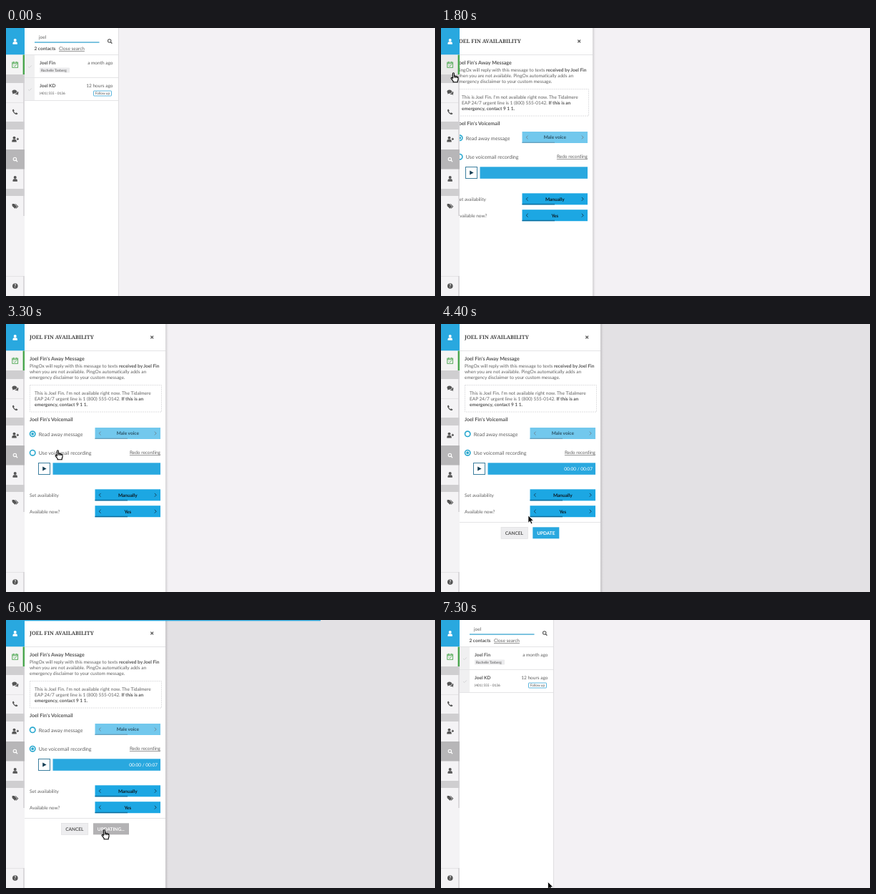
Write an HTML page that moves like this. It is 600 px wide and 375 px high and loops after 9200 ms.

```html
<!DOCTYPE html>
<html lang="en">
<head>
<meta charset="utf-8">
<title>Availability panel</title>
<style>
  html, body { margin: 0; width: 100%; height: 100%; overflow: hidden; background: #f3f1f4; }
  svg { display: block; width: 600px; height: 375px; }
  text { font: 6.5px Lato, sans-serif; fill: #606060; white-space: pre; text-rendering: geometricPrecision; }
  .b { font-weight: 700; fill: #555; }
  .m { font-size: 7.1px; }
  .s { font-size: 4.8px; fill: #505050; }
  .u { text-decoration: underline; }
  .e { text-anchor: end; }
  .c { text-anchor: middle; }
  .w { fill: #fff; }
  .title { font: 700 7.4px "Noto Serif", serif; fill: #444; }
  .line { stroke: #e4e4e6; stroke-width: 1; }
  .blue { fill: #29a8df; }
  .ico { fill: #555; }
</style>
</head>
<body>
<svg viewBox="0 0 600 375">
  <defs>
    <linearGradient id="shade"><stop offset="0" stop-opacity=".13"/><stop offset="1" stop-opacity="0"/></linearGradient>
    <g id="user"><circle cy="-1.9" r="2"/><path d="M-3.2 3.7V2.2Q-3.2 .2-1.3 .2H1.3Q3.2 .2 3.2 2.2V3.7Z"/></g>
    <g id="lens" fill="none" stroke-linecap="round"><circle cx="-.6" cy="-.6" r="2.2" stroke-width="1.1"/><path d="M1.1 1.1L2.7 2.7" stroke-width="1.3"/></g>
    <g id="calendar" fill="none" stroke-width=".9"><rect x="-3.9" y="-3.1" width="7.8" height="7.2"/><path d="M-3.9-1.3H3.9M-2-4.4V-2M2-4.4V-2M-1.8 1.2L-.5 2.5L2 0"/></g>
    <g id="chat"><ellipse cx="-1.2" cy="-.9" rx="3.3" ry="2.5"/><path d="M-3.4 .4L-3.9 2.6L-.8 1.3Z"/><path d="M2.8-1.6Q5 -.6 4.4 1.2Q4 2 3.6 2.3L4.4 3.8L1.9 2.9Q0 3-.8 2.3Q3 2 2.8-1.6Z"/></g>
    <path id="phone" d="M-3.7-2.8L-2.2-3.8L-.9-1.4L-1.9-.5Q-1.2 1 .5 1.9L1.4 .9L3.8 2.2L2.8 3.7Q1 4.2-1.7 1.6Q-4.2-1-3.7-2.8Z"/>
    <g id="tags"><path d="M-4.4-3H-1.4L2.4 .8L-.5 3.7L-4.4-.1Z"/><path d="M-.4-3H.5L4.4 .8L1.4 3.7L.8 3.1L3 .8Z"/></g>
    <g id="select">
      <rect x="124.5" width="91.5" height="16" fill="#1ca7e3"/>
      <rect x="124.5" y="14.6" width="45.5" height="1.4" fill="#0d6c9b"/>
      <path d="M132.6 5.6L130.2 8L132.6 10.4M207.8 5.6L210.2 8L207.8 10.4" fill="none" stroke="#14384c" stroke-width=".9"/>
    </g>
  </defs>

  <rect width="600" height="375" fill="#f3f1f4"/>
  <rect id="dim" x="157" width="443" height="375" fill="#e3e1e4"/>

  <g id="list">
    <rect x="26" width="131" height="375" fill="#fff"/>
    <rect x="157" width="1" height="375" fill="#dfdee0"/>
    <text x="46" y="14.6">joel</text>
    <rect x="40" y="19.4" width="90.5" height="1.3" fill="#3aa5cf"/>
    <use href="#lens" x="145.3" y="18.6" stroke="#555"/>
    <text class="b" x="39.5" y="31.2">2 contacts</text>
    <text class="u" x="74" y="31.2">Close search</text>
    <rect x="26" y="37.5" width="14" height="64" fill="#f0f0f1"/>
    <path d="M31 54L32.6 55.6L35.8 52.4M31 86L32.6 87.6L35.8 84.4" fill="none" stroke="#d2d2d4" stroke-width=".9"/>
    <path class="line" d="M26 37.5H157M26 69.5H157M26 101.5H157"/>
    <text class="b" x="47" y="50.8">Joel Fin</text>
    <text class="e" x="149.5" y="50.8">a month ago</text>
    <rect x="47" y="55.5" width="42" height="7" rx="1" fill="#ebebed"/>
    <text class="s" x="49" y="60.8">Rochelle Tanberg</text>
    <text class="b" x="47" y="82.8">Joel KD</text>
    <text class="e" x="149.5" y="82.8">12 hours ago</text>
    <text class="s" x="47" y="93.3">(401) 555 - 0136</text>
    <rect x="122.5" y="88" width="25" height="7" rx=".6" fill="#fff" stroke="#4fb0dc" stroke-width=".9"/>
    <text class="s c" x="135" y="93.2">Follow up</text>
  </g>

  <g id="panel">
    <rect x="223" width="4" height="375" fill="url(#shade)"/>
    <rect x="26" width="197" height="375" fill="#fff"/>
    <text class="title" x="33" y="21.2">JOEL FIN AVAILABILITY</text>
    <path d="M202.3 16.6L206.1 20.4M206.1 16.6L202.3 20.4" stroke="#555" stroke-width="1.3"/>
    <path class="line" d="M26 37.5H223"/>
    <text class="b m" x="33" y="51">Joel Fin's Away Message</text>
    <text x="33" y="61.3">PingOx will reply with this message to texts <tspan class="b">received by Joel Fin</tspan></text>
    <text x="33" y="69.3">when you are not available. PingOx automatically adds an</text>
    <text x="33" y="77.3">emergency disclaimer to your custom message.</text>
    <rect x="33.5" y="85.5" width="184" height="37.5" fill="none" stroke="#d6d6d8" stroke-width=".8" stroke-dasharray="2 1"/>
    <text x="40" y="98.8">This is Joel Fin. I'm not available right now. The Tidalmere</text>
    <text x="40" y="106.8">EAP 24/7 urgent line is 1 (800) 555-0142. <tspan class="b">If this is an</tspan></text>
    <text class="b" x="40" y="114.8">emergency, contact 9 1 1.</text>
    <text class="b m" x="33" y="136.4">Joel Fin's Voicemail</text>

    <g fill="#fff" stroke="#29a8cf" stroke-width="1.6"><circle cx="37.2" cy="153.8" r="3.7"/><circle cx="37.2" cy="180.2" r="3.7"/></g>
    <circle id="dot" cx="37.2" r="1.9" fill="#29a8cf"/>
    <text class="m" x="45.8" y="156.5">Read away message</text>
    <use href="#select" y="145" opacity=".62"/>
    <text class="b c" x="170.3" y="155.4" style="fill:#2d5468">Male voice</text>
    <text class="m" x="45.8" y="182.8">Use voicemail recording</text>
    <text class="e u" x="216" y="182.4">Redo recording</text>
    <rect x="45.5" y="194.5" width="16" height="16" fill="#fff" stroke="#3d7f9f"/>
    <path d="M51.2 199.4L56.6 202.4L51.2 205.4Z" fill="#173f55"/>
    <rect class="blue" x="65.5" y="194.3" width="150.5" height="16.5"/>
    <text id="clock" class="e w" x="212" y="204.9">00:00 / 00:07</text>

    <text x="33" y="241.8">Set availability</text>
    <use href="#select" y="231.3"/>
    <text class="b c" x="170.3" y="241.7" style="fill:#0c1a22">Manually</text>
    <text x="33" y="264.8">Available now?</text>
    <use href="#select" y="254.2"/>
    <text class="b c" x="170.3" y="264.6" style="fill:#0c1a22">Yes</text>

    <g id="actions">
      <path class="line" d="M26 277.5H223"/>
      <g id="cancel">
        <rect x="84" y="284.3" width="37.3" height="16" fill="#ededef" stroke="#dcdcde" stroke-width=".6"/>
        <text class="b c" x="102.3" y="294.6">CANCEL</text>
      </g>
      <rect id="save" y="284.3" height="16"/>
      <text id="saveText" class="b c" x="146.8" y="294.6" style="fill:#fff"></text>
    </g>
  </g>

  <g id="side">
    <rect width="26" height="375" fill="#f4f3f5"/>
    <g fill="#cfced0"><rect y="65" width="26" height="12"/><rect y="131" width="26" height="11"/><rect y="225" width="26" height="10"/></g>
    <path d="M0 104.5H25M0 347.5H25" stroke="#e4e3e5"/>
    <path d="M25 65V263M25 347V375" stroke="#d2d1d3" stroke-width="1.5"/>
    <rect class="blue" width="26" height="37.5"/>
    <rect id="tab" y="37.5" width="26" height="27.5"/>
    <rect id="tabEdge" x="23.6" y="37.5" width="2.4" height="27.5" fill="#4aa64e"/>
    <rect y="170" width="26" height="27.5" fill="#b7b6b8"/>
    <use href="#user" x="12.7" y="19" fill="#fff"/>
    <use id="tabIcon" href="#calendar" x="12.7" y="51.2" stroke="#4aa64e"/>
    <g class="ico">
      <use href="#chat" x="13" y="90"/>
      <use href="#phone" x="12.7" y="117.3"/>
      <use href="#user" x="11.5" y="155.7"/>
      <path d="M14.8 155.4H18M16.4 153.8V157" stroke="#555" stroke-width="1.2"/>
      <use href="#user" x="12.7" y="211"/>
      <use href="#tags" x="13" y="249"/>
      <circle cx="12.8" cy="361" r="3.8"/>
    </g>
    <use href="#lens" x="13" y="184" stroke="#fff"/>
    <text class="b c" x="12.8" y="363.3" style="fill:#fff">?</text>
  </g>

  <rect id="bar" class="blue" height="1.3"/>

  <g id="cursor">
    <path id="arrow" d="M0 0V10.2L2.4 8L4 11.7L5.8 10.9L4.2 7.3H7.4Z" fill="#000" stroke="#fff" stroke-width=".7"/>
    <path id="hand" transform="translate(.7 .7)" d="M-1.3 1Q-1.3 0 -.3 0Q.7 0 .7 1V4.6Q2.2 4 2.7 5.1Q4.2 4.6 4.6 5.7Q6.3 5.3 6.3 6.9V9.2Q6.2 10.6 5.5 11.4V13H-.6V11.8L-3.2 8.4Q-4 7.2-3.1 6.7Q-2.3 6.4-1.3 7.6ZM.7 4.6V7M2.7 5.1V7.2M4.6 5.7V7.4" fill="#fff" stroke="#000" stroke-width="1.1"/>
  </g>
</svg>
<script>
const LOOP = 9200, STEP = 100;
const $ = id => document.getElementById(id);
const set = (id, attrs) => { for (const k in attrs) $(id).setAttribute(k, attrs[k]); };
const show = (id, on) => set(id, { visibility: on ? "visible" : "hidden" });
const within = (t, a, b) => t >= a && t < b;

// Rows are [time, value, ...]; values are interpolated linearly.
function track(rows, t) {
  if (t <= rows[0][0]) return rows[0].slice(1);
  for (let i = 1; i < rows.length; i++) {
    const a = rows[i - 1], b = rows[i];
    if (t < b[0]) {
      const p = (t - a[0]) / (b[0] - a[0]);
      return a.slice(1).map((v, k) => v + (b[k + 1] - v) * p);
    }
  }
  return rows[rows.length - 1].slice(1);
}

const pointer = [
  [500, 148, 350], [600, 128, 290], [700, 98, 205], [800, 65, 125], [900, 30, 78], [1000, 17, 62],
  [2800, 17, 62], [3000, 48, 128], [3200, 72, 176],
  [4100, 72, 176], [4200, 82, 196], [4400, 122, 268], [4700, 137, 293],
  [6700, 137, 293], [6900, 144, 322], [7300, 149.5, 366.5]
];
const slide = [[1400, -202], [1500, -140], [1600, -65], [1700, -22], [1900, 0],
  [6700, 0], [6800, -40], [6900, -120], [7000, -180], [7100, -202]];
const dim = [[3500, 0], [4100, 1], [6700, 1], [7200, 0]];
const actions = [[3500, 0], [3900, 1]];
const progress = [[5500, 0], [5600, 50], [5800, 280], [6000, 440], [6400, 600]];
const barFade = [[6400, 1], [6600, 0]];
const tabGrey = [[900, 244], [1000, 198], [1400, 198], [1600, 234], [2800, 234], [3000, 244]];

function draw(t) {
  const [x, y] = track(pointer, t);
  set("cursor", { transform: `translate(${x} ${y})` });
  const hand = within(t, 900, 2900) || within(t, 3200, 4200) || within(t, 4600, 6800);
  show("hand", t >= 500 && hand);
  show("arrow", t >= 500 && !hand);

  const g = Math.round(track(tabGrey, t)[0]);
  const pressed = within(t, 1000, 1500);
  set("tab", { fill: `rgb(${g},${g},${g})` });
  set("tabIcon", { opacity: pressed ? 0.08 : 1 });
  set("tabEdge", { opacity: pressed ? 0.45 : 1 });

  set("panel", { transform: `translate(${track(slide, t)[0]} 0)` });
  set("dim", { opacity: track(dim, t)[0] });

  const recorded = t >= 3500;
  set("dot", { cy: recorded ? 180.2 : 153.8 });
  set("clock", { opacity: recorded ? 1 : 0 });
  set("actions", { opacity: track(actions, t)[0] });

  const busy = t >= 5600;
  set("cancel", { transform: `translate(${busy ? -6.5 : 0} 0)` });
  set("save", { x: busy ? 122 : 128.3, width: busy ? 50 : 37, fill: busy ? "#b3b2b4" : "#29a8df" });
  $("saveText").textContent = busy ? "UPDATING..." : "UPDATE";

  set("bar", { width: track(progress, t)[0], opacity: track(barFade, t)[0] });
}

const start = performance.now();
function tick() {
  const t = (performance.now() - start) % LOOP;
  draw(Math.floor(t / STEP) * STEP);
  requestAnimationFrame(tick);
}
tick();
</script>
</body>
</html>
```
